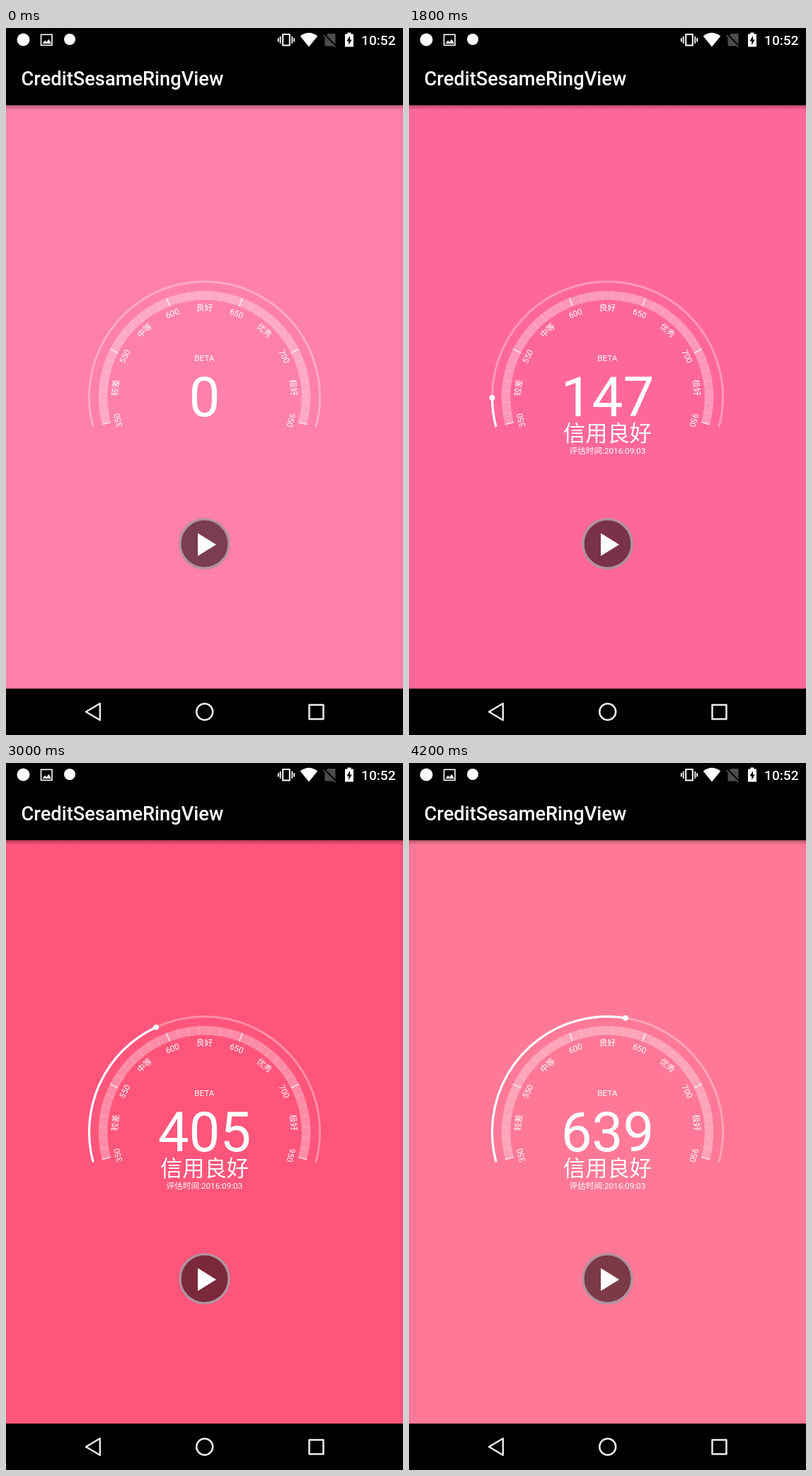
An HTML page with a canvas that plays this animation: 561 px wide and 998 px high, repeating every 4300 ms.

```html
<!DOCTYPE html>
<html lang="zh-CN">
<head>
<meta charset="utf-8">
<style>
html, body { margin: 0; width: 100%; height: 100%; overflow: hidden; background: #000; }
canvas { display: block; }
</style>
</head>
<body>
<canvas id="stage" width="561" height="998"></canvas>
<script>
const ctx = document.getElementById('stage').getContext('2d');
const LOOP = 4300, STEP = 100;
const RUN_START = 1100, RUN_TIME = 3000, FIRST_STEP = 1200;
const CX = 280.5, CY = 521, START = 165, SWEEP = 210, END_SWEEP = 114;
const FONT = 'Roboto, "Noto Sans CJK SC", "Noto Sans CJK", sans-serif';
const COLORS = [[255, 128, 171], [255, 64, 129], [255, 81, 119], [255, 121, 151]];
const SCORES = [[1200, 17], [1800, 147], [2500, 297], [3000, 405], [3700, 551], [4100, 637], [4200, 639]];
const LABELS = ['350', '较差', '550', '中等', '600', '良好', '650', '优秀', '700', '极好', '950'];
const white = alpha => `rgba(255,255,255,${alpha})`;
const rad = deg => deg * Math.PI / 180;
const mix = (a, b, p) => a + (b - a) * p;

function text(str, x, y, size, weight = 400, align = 'center') {
  ctx.font = `${weight} ${size}px ${FONT}`;
  ctx.textAlign = align;
  ctx.fillStyle = '#fff';
  ctx.fillText(str, x, y);
}

function path(points, close = true) {
  ctx.beginPath();
  points.forEach(([x, y]) => ctx.lineTo(x, y));
  if (close) ctx.closePath();
}

function polygon(points, color = '#fff') {
  path(points);
  ctx.fillStyle = color;
  ctx.fill();
}

function disc(x, y, r, color = '#fff') {
  ctx.beginPath();
  ctx.arc(x, y, r, 0, 2 * Math.PI);
  ctx.fillStyle = color;
  ctx.fill();
}

function stroke(width, color = '#fff') {
  ctx.lineWidth = width;
  ctx.strokeStyle = color;
  ctx.stroke();
}

function ring(r, sweep, width, color) {
  ctx.beginPath();
  ctx.arc(CX, CY, r, rad(START), rad(START + sweep));
  stroke(width, color);
}

// Runs draw() with the origin at the gauge centre and "up" pointing to the given sweep.
function atSweep(sweep, draw) {
  ctx.save();
  ctx.translate(CX, CY);
  ctx.rotate(rad(sweep - SWEEP / 2));
  draw();
  ctx.restore();
}

function background(progress) {
  const pos = progress * (COLORS.length - 1);
  const i = Math.min(Math.floor(pos), COLORS.length - 2);
  const rgb = COLORS[i].map((c, k) => Math.round(mix(c, COLORS[i + 1][k], pos - i)));
  ctx.fillStyle = '#000';
  ctx.fillRect(0, 0, 561, 998);
  ctx.fillStyle = `rgb(${rgb})`;
  ctx.fillRect(0, 109, 561, 823.5);
  const shadow = ctx.createLinearGradient(0, 109, 0, 116);
  shadow.addColorStop(0, 'rgba(0,0,0,.28)');
  shadow.addColorStop(1, 'rgba(0,0,0,0)');
  ctx.fillStyle = shadow;
  ctx.fillRect(0, 109, 561, 7);
}

function statusBar() {
  disc(24.5, 16.5, 9);
  disc(90, 16, 8);

  ctx.strokeStyle = '#fff';
  ctx.lineWidth = 1.6;
  ctx.strokeRect(49.5, 9.3, 15.5, 15);
  polygon([[51.5, 22], [55, 17.5], [57.3, 20], [60.3, 15.7], [64, 22]]);

  ctx.lineWidth = 2;
  ctx.strokeRect(391.2, 9, 9.6, 15.5);
  for (const side of [-1, 1]) {
    for (const [dx, half] of [[8.3, 5], [11.2, 2.7]]) {
      path([[396 + side * dx, 16.8 - half], [396 + side * dx, 16.8 + half]], false);
      stroke(1.8);
    }
  }

  ctx.beginPath();
  ctx.moveTo(428, 26.5);
  ctx.lineTo(415.8, 11.5);
  ctx.quadraticCurveTo(428, 2.2, 440.2, 11.5);
  ctx.fillStyle = '#fff';
  ctx.fill();

  polygon([[455, 8], [465.5, 8], [465.5, 25.5], [450.5, 25.5], [450.5, 12.5]], '#4d4d4d');
  path([[449, 9], [467, 27]], false);
  stroke(3.5, '#000');
  path([[448.5, 10], [465.5, 27]], false);
  stroke(1.7, '#555');

  ctx.fillStyle = '#fff';
  ctx.fillRect(482.5, 6.5, 5, 3);
  ctx.fillRect(479, 8.5, 12, 18);
  polygon([[486, 11], [481.5, 18.5], [484.3, 18.5], [484.3, 24], [488.7, 16.5], [486, 16.5]], '#000');

  text('10:52', 550.5, 24, 19.1, 500, 'right');
  text('CreditSesameRingView', 21.5, 81, 27.27, 500, 'left');
}

function navigationBar() {
  ctx.lineJoin = 'round';
  path([[113, 965.3], [132.8, 953.5], [132.8, 977]]);
  stroke(2.4, '#eee');
  ctx.beginPath();
  ctx.arc(280.7, 965.3, 11.5, 0, 2 * Math.PI);
  stroke(2.5, '#eee');
  ctx.strokeRect(428.5, 955.5, 20, 20);
  ctx.lineJoin = 'miter';
}

function dial() {
  ring(163, SWEEP, 3, white(.33));
  ring(143.5, SWEEP, 12.5, white(.32));
  for (let sweep = 0; sweep <= SWEEP; sweep += 6) {
    const major = sweep % 42 === 0;
    atSweep(sweep, () => {
      path([[0, -149.8], [0, -137.3]], false);
      stroke(major ? 1.6 : 1, white(major ? .75 : .24));
    });
  }
  LABELS.forEach((label, i) => atSweep(i * 21, () => text(label, 0, -122.4, 11.7)));
  text('BETA', 280.3, 470, 11.7);
}

function playButton() {
  disc(280.5, 728, 34, 'rgba(0,0,0,.52)');
  ctx.beginPath();
  ctx.arc(280.5, 728, 34.6, 0, 2 * Math.PI);
  stroke(3.4, 'rgb(178,146,158)');
  polygon([[271, 713], [271, 745.3], [297, 729.2]]);
}

function scoreAt(time) {
  const next = Math.max(1, SCORES.findIndex(([t]) => t >= time));
  const [t0, a] = SCORES[next - 1], [t1, b] = SCORES[next];
  return Math.round(mix(a, b, (time - t0) / (t1 - t0)));
}

function draw(now) {
  const time = Math.floor(now % LOOP / STEP) * STEP;
  const running = time >= FIRST_STEP;
  const linear = running ? Math.min(1, (time - RUN_START) / RUN_TIME) : 0;
  const eased = .5 - .5 * Math.cos(Math.PI * linear);

  background(eased);
  statusBar();
  navigationBar();
  dial();
  playButton();

  text(running ? scoreAt(time) : '0', 280.5, 548, 78);
  if (running) {
    const sweep = END_SWEEP * eased;
    ring(163, sweep, 3.2, '#fff');
    atSweep(sweep, () => disc(0, -163, 3.9));
    text('信用良好', 280.5, 583, 31.2);
    text('评估时间:2016:09:03', 280.3, 600.7, 11.7);
  }
  requestAnimationFrame(draw);
}
requestAnimationFrame(draw);
</script>
</body>
</html>
```
